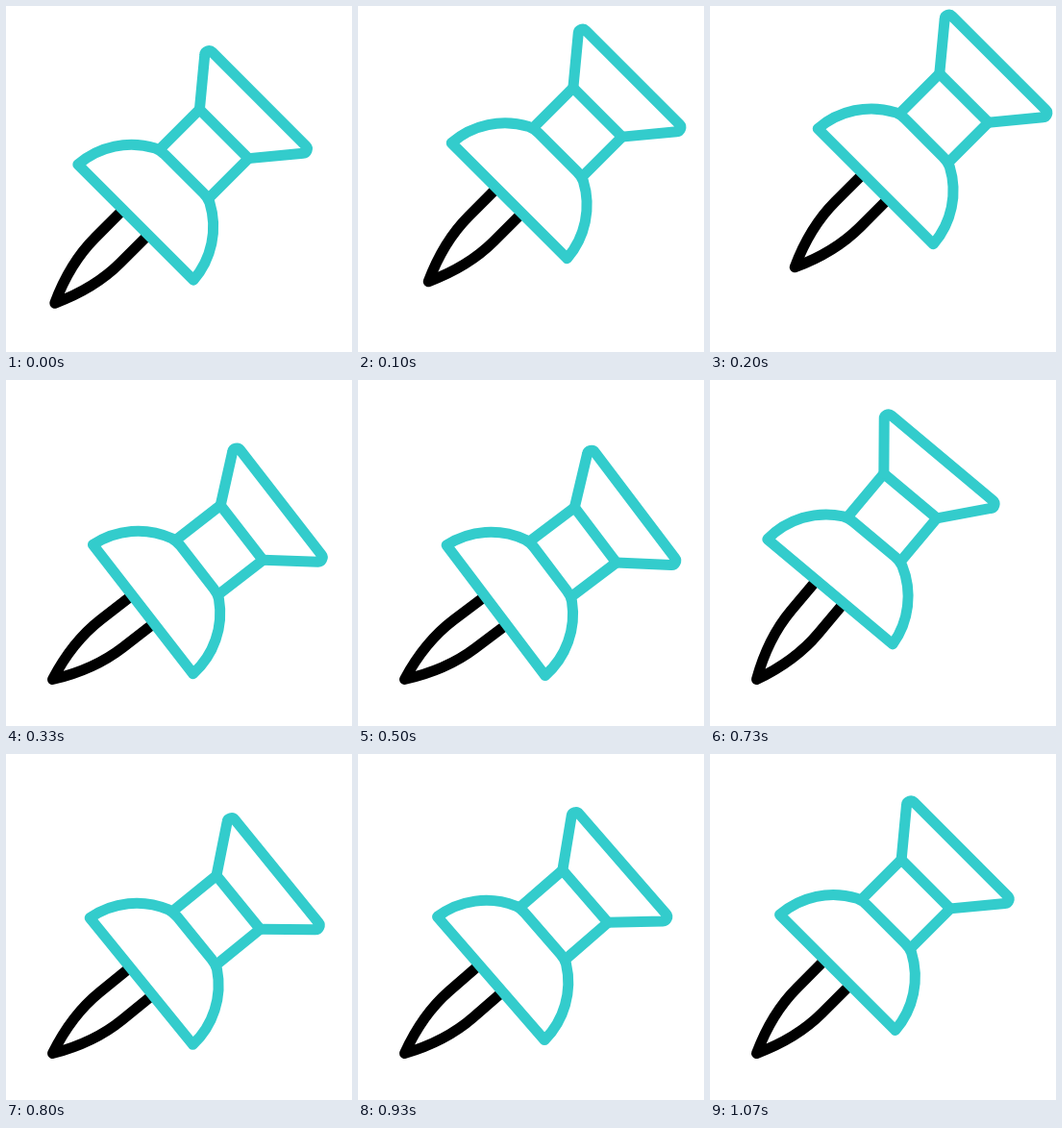
Write an HTML page that moves like this. It is 360x360 px and loops after 1670 ms.

```html
<!DOCTYPE html>
<html lang="en">
<head>
<meta charset="utf-8">
<title>Push pin</title>
<style>
  html, body { margin: 0; width: 100%; height: 100%; overflow: hidden; background: #fff; }
  svg { display: block; width: 100vw; height: 100vh; }
  path { fill: none; stroke: #3cc; stroke-width: 11; stroke-linejoin: round; stroke-linecap: round; }
  .needle { stroke: #000; stroke-linecap: butt; }
</style>
</head>
<body>
<svg viewBox="0 0 360 360">
  <!-- Tip at the origin, y pointing up along the pin -->
  <g id="pin">
    <path class="needle" d="M-18.5 118V78C-18.5 52 -11 24 0 0C11 24 18.5 52 18.5 78V118"/>
    <path d="M-85 119A85.2 85.2 0 0 0 -40 187.9Q-35 190.3 -28 190.3H28Q35 190.3 40 187.9A85.2 85.2 0 0 0 85 119Z"/>
    <path d="M-36 190V249H36V190"/>
    <path d="M-36 249L-72.4 293A4.5 4.5 0 0 0 -69 300.5H69A4.5 4.5 0 0 0 72.4 293L36 249"/>
  </g>
</svg>
<script>
  const LOOP = 1670, LAST = 32;
  const TIP = { x: 48.5, y: 311.5 };
  const pin = document.getElementById('pin');

  // [step, lift in px, tilt in degrees]
  const keys = [
    [0, 0, 0], [6.9, 40, 0], [8.8, 0, 0], [13.7, 0, 17],
    [20.4, 0, -16.4], [25.7, 0, 7], [33, 0, 0]
  ];

  const ease = x => x * x * (3 - 2 * x);
  const mix = (a, b, p) => a + (b - a) * p;

  // 30 steps a second, on times rounded to 10 ms
  function stepAt(t) {
    const rest = t % 100;
    const part = rest >= 70 ? 2 : rest >= 30 ? 1 : 0;
    return Math.min(LAST, 3 * Math.floor(t / 100) + part);
  }

  function pose(step) {
    const i = Math.max(1, keys.findIndex(k => k[0] >= step));
    const a = keys[i - 1], b = keys[i];
    const p = ease((step - a[0]) / (b[0] - a[0]));
    return { lift: mix(a[1], b[1], p), tilt: mix(a[2], b[2], p) };
  }

  function draw(now) {
    const { lift, tilt } = pose(stepAt(now % LOOP) + 1);
    pin.setAttribute('transform',
      `translate(${TIP.x + lift} ${TIP.y - lift}) rotate(${45 + tilt}) scale(1 -1)`);
  }

  const start = performance.now();
  function tick() {
    draw(performance.now() - start);
    requestAnimationFrame(tick);
  }
  tick();
</script>
</body>
</html>
```
